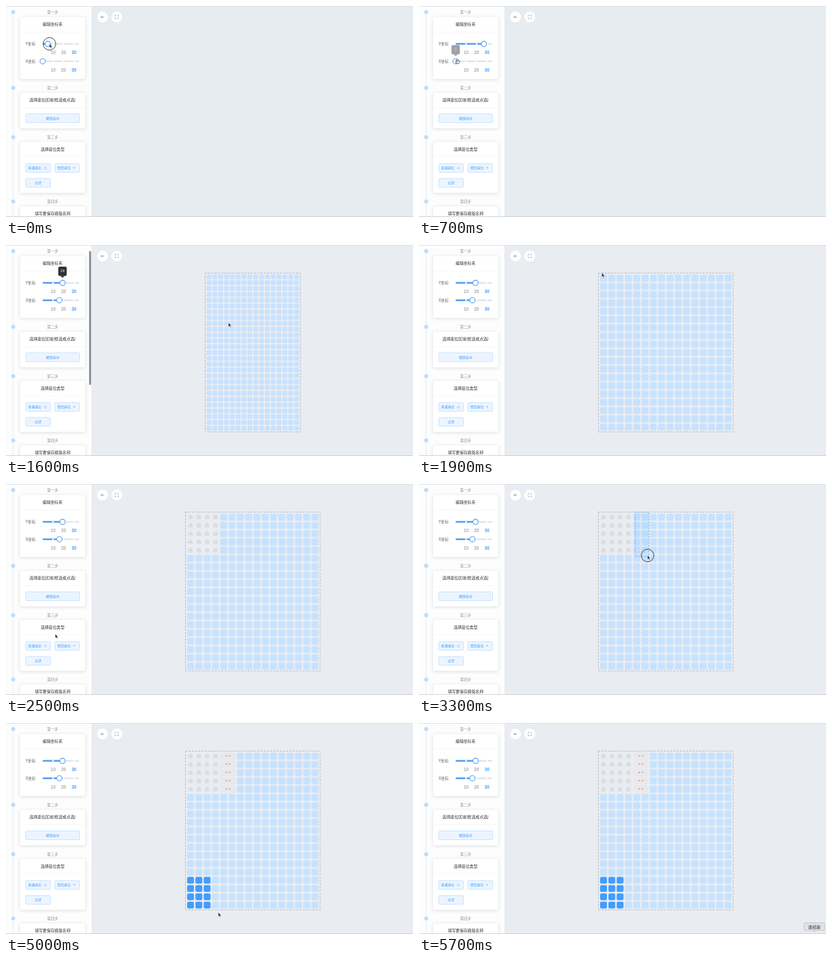
An HTML page with a canvas for the animation above (5800 ms loop, 600x312 px).

```html
<!DOCTYPE html>
<html lang="zh">
<head>
<meta charset="utf-8">
<style>
html, body { margin: 0; width: 600px; height: 312px; overflow: hidden; background: #fff; }
canvas { display: block; }
</style>
</head>
<body>
<canvas id="stage" width="600" height="312"></canvas>
<script>
const ctx = document.getElementById('stage').getContext('2d');
const LOOP = 5800, STEP = 100;
const BLUE = '#409eff', PALE = '#c6e2ff', GRAY = '#909399', INK = '#303133';
const CJK = '"Noto Sans CJK SC", "Noto Sans CJK", sans-serif';
const LATIN = '"Liberation Sans", sans-serif';
const COLS = 16, ROWS_FIRST = 27, ROWS_LAST = 19;
const Y_ROW = 56, X_ROW = 81.7;

const lerp = (a, b, k) => a + (b - a) * Math.min(1, Math.max(0, k));
const sliderX = value => 54 + value / 35 * 54;

function layout(rows) {
  const pitch = 232.5 / rows, width = COLS * pitch + 2.8;
  return { pitch, width, left: 363.8 - width / 2, top: 41.5 };
}

// Each gesture lasts from a to b; the pointer travels straight between them.
function slide(a, b, row, v0, v1) {
  return { a, b, row, v0, v1, held: true, from: [sliderX(v0) + 2.5, row], to: [sliderX(v1) + 2.5, row] };
}

function select(a, b, c, r, w, h, done, kind) {
  const { pitch, left, top } = layout(ROWS_LAST);
  return {
    a, b, c, r, w, h, done, kind, held: true,
    from: [left + 1.4 + (c + .3) * pitch, top + r * pitch],
    to: [left + (c + w) * pitch - 1, top + (r + h) * pitch + 3]
  };
}

const rest = (a, b, x, y, held = false) => ({ a, b, held, from: [x, y], to: [x, y] });
const click = (t, x, y) => rest(t - 50, t + 40, x, y, true);

const GESTURES = [
  slide(-100, 450, Y_ROW, 0, 27),
  slide(700, 1100, X_ROW, 0, 16),
  slide(1300, 1400, Y_ROW, 27, 19),
  rest(1600, 1600, 328, 115),
  select(1900, 2200, 0, 0, 4, 5, 2400, 'seat'),
  click(2400, 48, 240),
  select(3100, 3300, 4, 0, 2, 5, 3700, 'couple'),
  click(3700, 90, 240),
  select(4000, 4100, 0, 15, 3, 4, LOOP, ''),
  rest(4300, 4700, 109, 255),
  rest(5400, LOOP, 585, 314)
];
const SLIDES = GESTURES.filter(g => g.row);
const AREAS = GESTURES.filter(g => g.kind !== undefined);

function pointerAt(t) {
  const i = GESTURES.findLastIndex(g => g.a <= t);
  const g = GESTURES[i], next = GESTURES[i + 1];
  const inside = t <= g.b;
  const [from, to, a, b] = inside ? [g.from, g.to, g.a, g.b] : [g.to, next.from, g.b, next.a];
  const k = (t - a) / (b - a || 1);
  return {
    x: lerp(from[0], to[0], k), y: lerp(from[1], to[1], k),
    held: inside && g.held && t > g.a,
    hand: g.row && t === g.a,
    gesture: inside ? g : null
  };
}

function paint(fill, stroke, width) {
  if (fill) { ctx.fillStyle = fill; ctx.fill(); }
  if (stroke) { ctx.strokeStyle = stroke; ctx.lineWidth = width; ctx.stroke(); }
}

function box(x, y, w, h, r, fill, stroke, width = .8) {
  ctx.beginPath();
  ctx.roundRect(x, y, w, h, r);
  paint(fill, stroke, width);
}

function disc(x, y, r, fill, stroke, width = 1) {
  ctx.beginPath();
  ctx.arc(x, y, r, 0, 7);
  paint(fill, stroke, width);
}

function path(points, fill, stroke, width = 1, close = true) {
  ctx.beginPath();
  points.forEach(p => ctx.lineTo(...p));
  if (close) ctx.closePath();
  paint(fill, stroke, width);
}

function text(s, x, y, size, color, { align = 'center', weight = 400, font = CJK } = {}) {
  ctx.font = `${weight} ${size}px ${font}`;
  ctx.textAlign = align;
  ctx.textBaseline = 'middle';
  ctx.fillStyle = color;
  ctx.fillText(s, x, y);
}

function seatIcon(x, y, s, color) {
  box(x - s * .6, y - s, s * 1.2, s * 1.2, s * .3, null, color, .7);
  box(x - s, y - s * .1, s * 2, s, s * .3, null, color, .7);
}

function heart(x, y, s, color) {
  disc(x - s * .45, y - s * .3, s * .55, color);
  disc(x + s * .45, y - s * .3, s * .55, color);
  path([[x - s, y], [x + s, y], [x, y + s]], color);
}

function card(title, y, h) {
  ctx.save();
  ctx.shadowColor = 'rgba(0,0,0,.13)';
  ctx.shadowBlur = 5;
  ctx.shadowOffsetY = 1;
  box(20.5, y, 96.5, h, 2, '#fff');
  ctx.restore();
  box(20.5, y, 96.5, h, 2, null, '#eff1f4', .6);
  box(21, y + 22, 95.5, .6, 0, '#eef0f4');
  text(title, 68.7, y + 10.8, 5.85, INK, { weight: 500 });
}

function button(label, x, y, w, labelX = x + w / 2) {
  box(x, y, w, 13, 1.5, '#ecf5ff', '#bfdeff');
  text(label, labelX, y + 6.2, 4.9, BLUE, { weight: 500 });
}

function slider(label, y, value) {
  text(label, 29, y, 5.8, '#606266', { align: 'left' });
  box(54, y - 1.3, 54, 2.6, 1.3, '#e1e5ec');
  box(54, y - 1.3, sliderX(value) - 54, 2.6, 1.3, '#549ff2');
  for (const v of [10, 20, 30]) {
    const last = v === 30;
    disc(sliderX(v), y, 1.3, '#fff');
    text(v, sliderX(v), y + 13.2, 6.3, last ? BLUE : '#7d8087', { weight: last ? 700 : 400, font: LATIN });
  }
  disc(sliderX(value), y, 3.9, '#fff', '#549ff2', 1.1);
}

function tip(value, y, alpha) {
  const x = sliderX(value);
  ctx.globalAlpha = alpha;
  box(x - 6.2, y - 24, 12.4, 13.7, 2, INK);
  path([[x - 3, y - 10.3], [x + 3, y - 10.3], [x, y - 7.5]], INK);
  text(Math.round(value), x, y - 17, 5.4, '#fff', { font: LATIN });
  ctx.globalAlpha = 1;
}

function sliderValue(row, t) {
  const g = SLIDES.findLast(s => s.row === row && s.a <= t);
  return g ? lerp(g.v0, g.v1, (t - g.a) / (g.b - g.a)) : 0;
}

function sidebar(t) {
  box(0, 0, 126, 312, 0, '#fdfdfe');
  box(10, 9, 1, 303, 0, '#e0eefd');
  [9, 121, 194, 289].forEach((y, i) => {
    disc(10.6, y, 3, '#bcdcfd');
    text(`第${'一二三四'[i]}步`, 68.7, y, 5.4, GRAY);
  });
  card('编辑坐标系', 16, 92);
  card('选择座位区域(框选或点选)', 128, 53);
  card('选择座位类型', 200.5, 76);
  card('填写要保存模版名称', 296, 40);

  slider('Y坐标', Y_ROW, sliderValue(Y_ROW, t));
  slider('X坐标', X_ROW, sliderValue(X_ROW, t));
  for (const { a, b, row } of SLIDES) {
    if (t > 0 && t >= a && t <= b + 200) tip(sliderValue(row, t), row, t === a ? .45 : 1);
  }

  button('撤销选中', 29, 159.5, 79.5);
  button('普通座位', 29, 233, 36.5, 42.4);
  button('情侣座位', 72, 233, 36.5, 85.6);
  button('过滤', 29, 255, 36.5);
  seatIcon(58, 239.5, 1.9, '#c5d3e2');
  heart(100.5, 239.3, 1.2, '#a6a9b8');
  if (t >= 1400 && t <= 1700) box(122.6, 9, 2.8, 198, 1.4, '#83878c');
}

function toolbar() {
  const ink = '#85888d', y = 16.3;
  disc(142.3, y, 8, '#fff');
  disc(163.3, y, 8, '#fff');
  path([[144.4, y], [140, y]], null, ink, .8, false);
  path([[141.8, y - 1.8], [140, y], [141.8, y + 1.8]], null, ink, .8, false);
  for (const sx of [-1, 1]) for (const sy of [-1, 1]) {
    const cx = 163.3 + sx * 2.4, cy = y + sy * 2.4;
    path([[cx - sx * 1.5, cy], [cx, cy], [cx, cy - sy * 1.5]], null, ink, .7, false);
  }
}

function seatState(c, r, t) {
  const area = AREAS.find(g => c >= g.c && c < g.c + g.w && r >= g.r && r < g.r + g.h);
  if (!area || t <= area.b) return 'free';
  return t >= area.done ? area.kind : 'picked';
}

function grid(t) {
  const rows = t < 1700 ? ROWS_FIRST : ROWS_LAST;
  const { pitch, width, left, top } = layout(rows);
  const size = pitch * .82;
  dashed([3, 1.8], () => box(left, top, width, 234.8, 0, null, '#b9bdc3', 1));
  for (let r = 0; r < rows; r++) for (let c = 0; c < COLS; c++) {
    const x = left + 1.4 + (c + .5) * pitch, y = top + 1.3 + (r + .5) * pitch;
    const state = seatState(c, r, t);
    if (state === 'seat') {
      seatIcon(x, y, 2.8, '#c9cbce');
    } else if (state === 'couple') {
      if (c % 2) continue;
      box(x - size / 2, y - size / 2, pitch + size, size, 2, '#e9e9ec');
      for (const side of [-1, 1]) heart(x + pitch / 2 + side * 2.4, y - .3, 1.2, '#e58d94');
    } else {
      box(x - size / 2, y - size / 2, size, size, 2.3, state === 'picked' ? BLUE : PALE);
    }
  }
}

function dashed(pattern, drawShape) {
  ctx.setLineDash(pattern);
  drawShape();
  ctx.setLineDash([]);
}

function lasso({ x, y, gesture }) {
  if (!AREAS.includes(gesture)) return;
  const [x0, y0] = gesture.from;
  dashed([2.5, 1.8], () => box(x0, y0, x + 2 - x0, y + 1.5 - y0, 0, 'rgba(64,158,255,.08)', '#6aaef2', .9));
}

function pointer({ x, y, held, hand }) {
  if (hand) {
    box(x - 2.3, y - 1.5, 5.4, 5, 2.2, '#fff', '#444', .9);
    box(x - 1.2, y - 3, 1.8, 4, .9, '#fff', '#444', .7);
    return;
  }
  if (held) disc(x, y, 9.3, null, '#333', .9);
  path([[x, y], [x, y + 5.8], [x + 1.4, y + 4.6], [x + 2.4, y + 6.8], [x + 3.4, y + 6.3],
    [x + 2.4, y + 4.2], [x + 4.2, y + 4.2]], '#222', '#fff', .4);
}

function dockLabel() {
  box(567.5, 295.5, 30.5, 11.5, 2, '#e2e2e4', '#b9babd', .7);
  path([[580, 307], [586, 307], [583, 310]], '#d5d6d8');
  text('废纸篓', 583, 301.3, 6, INK);
}

function draw(t) {
  const p = pointerAt(t), hasGrid = t >= 1200;
  box(0, 0, 600, 312, 0, hasGrid ? '#e9ecf1' : '#e6ecf0');
  sidebar(t);
  toolbar();
  if (hasGrid) grid(t);
  lasso(p);
  box(0, 0, 600, .7, 0, '#d9dbde');
  box(0, 311, 600, 1, 0, '#d0d2d5');
  if (t >= 5500) dockLabel();
  pointer(p);
}

const start = performance.now();
function tick() {
  const t = (performance.now() - start) % LOOP;
  draw(Math.floor(t / STEP) * STEP);
  requestAnimationFrame(tick);
}
tick();
</script>
</body>
</html>
```
